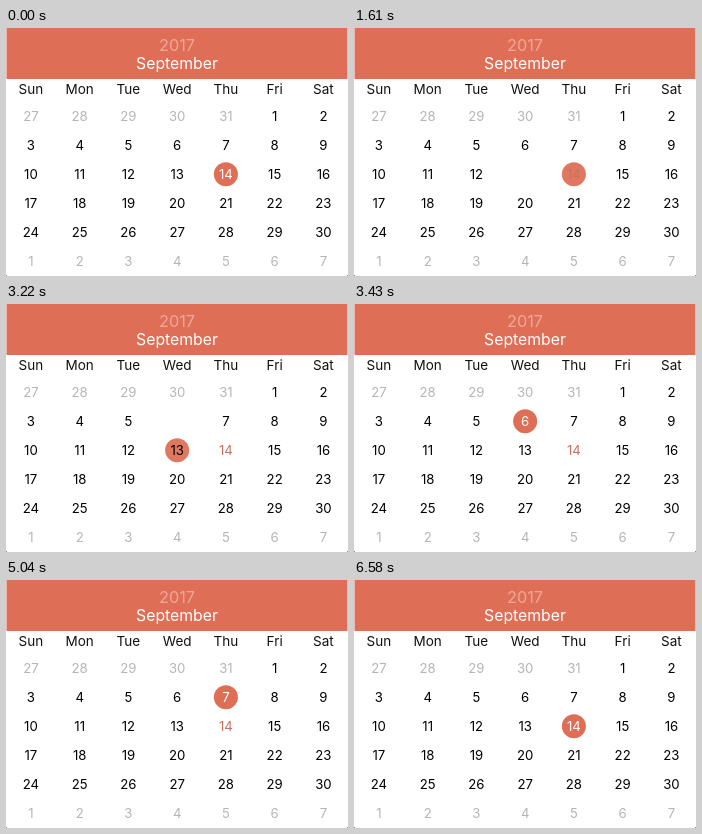
An HTML page with a canvas for the animation above (7.63 s loop, 342 by 248 pixels).

```html
<!DOCTYPE html>
<html lang="en">
<head>
<meta charset="utf-8">
<title>Calendar</title>
<style>
  html, body { margin: 0; width: 100%; height: 100%; overflow: hidden; background: #fff; }
  canvas { display: block; width: 342px; height: 248px; }
</style>
</head>
<body>
<canvas id="stage"></canvas>
<script>
const W = 342, H = 248;
const LOOP = 7630, STEP = 70;
const ACCENT = '#de6e56', TODAY_TEXT = '#cb705d';
const FAMILY = 'Inter, "Liberation Sans", sans-serif';
const TODAY = 14, RADIUS = 12;
const WEEKDAYS = ['Sun', 'Mon', 'Tue', 'Wed', 'Thu', 'Fri', 'Sat'];

// Each tap moves the selection to another day.
const TAPS = [
  { at: 1610, from: 14, to: 13 },
  { at: 3220, from: 13, to: 6 },
  { at: 4690, from: 6, to: 7 },
  { at: 6370, from: 7, to: 14 }
];

const canvas = document.getElementById('stage');
const ratio = window.devicePixelRatio || 1;
canvas.width = W * ratio;
canvas.height = H * ratio;
const ctx = canvas.getContext('2d');
ctx.scale(ratio, ratio);
ctx.textAlign = 'center';

const colX = col => 24.9 + 48.75 * col;
const rowY = row => 88.3 + 29 * row;

function cellOf(day) {
  const index = day + 4;
  return { x: colX(index % 7), y: rowY(Math.floor(index / 7)) };
}

function label(text, x, baseline, size, color) {
  ctx.font = `${size}px ${FAMILY}`;
  ctx.fillStyle = color;
  ctx.fillText(text, x, baseline);
}

function disc(day, scale, alpha) {
  if (scale <= 0 || alpha <= 0) return;
  const { x, y } = cellOf(day);
  ctx.globalAlpha = alpha;
  ctx.fillStyle = ACCENT;
  ctx.beginPath();
  ctx.arc(x, y, RADIUS * scale, 0, Math.PI * 2);
  ctx.fill();
  ctx.globalAlpha = 1;
}

// Grows from 0.3 to 1.2, then settles at 1.
function popScale(elapsed) {
  const t = elapsed - 20;
  if (t < 0) return 0;
  if (t < 112.5) return 0.3 + 0.9 * t / 112.5;
  if (t < 150) return 1.2 - 0.2 * (t - 112.5) / 37.5;
  return 1;
}

function fadeAlpha(elapsed) {
  const p = Math.min(1, (elapsed + 40) / 250);
  return 1 - p * p * (3 - 2 * p);
}

function drawFrame() {
  ctx.fillStyle = '#fff';
  ctx.fillRect(0, 0, W, H);
  ctx.fillStyle = ACCENT;
  ctx.fillRect(0.5, 0, W - 1, 51);
  label('2017', 171, 22.7, 16.3, '#f0a797');
  label('September', 171, 41, 15.8, '#fff');
  WEEKDAYS.forEach((name, col) => label(name, colX(col), 66.4, 13.5, '#111'));
  ctx.fillStyle = '#888';
  ctx.fillRect(0, H - 1, 1, 1);
  ctx.fillRect(W - 1, H - 1, 1, 1);
}

function dayColor(day, selected) {
  if (day < 1 || day > 30) return '#b5b5b5';
  if (day === selected) return '#fff';
  return day === TODAY ? TODAY_TEXT : '#000';
}

function drawDays(selected) {
  for (let day = -4; day <= 37; day++) {
    const { x, y } = cellOf(day);
    const shown = day < 1 ? day + 31 : day > 30 ? day - 30 : day;
    label(String(shown), x, y + 4.8, 13.2, dayColor(day, selected));
  }
}

function draw(time) {
  const t = Math.floor((time % LOOP) / STEP) * STEP;
  const tap = TAPS.filter(item => item.at <= t).pop();
  const selected = tap ? tap.to : TODAY;

  drawFrame();
  if (tap) {
    disc(tap.from, 1, fadeAlpha(t - tap.at));
    disc(tap.to, popScale(t - tap.at), 1);
  } else {
    disc(TODAY, 1, 1);
  }
  drawDays(selected);
}

let start;
function tick(now) {
  if (start === undefined) start = now;
  draw(now - start);
  requestAnimationFrame(tick);
}
requestAnimationFrame(tick);
</script>
</body>
</html>
```
